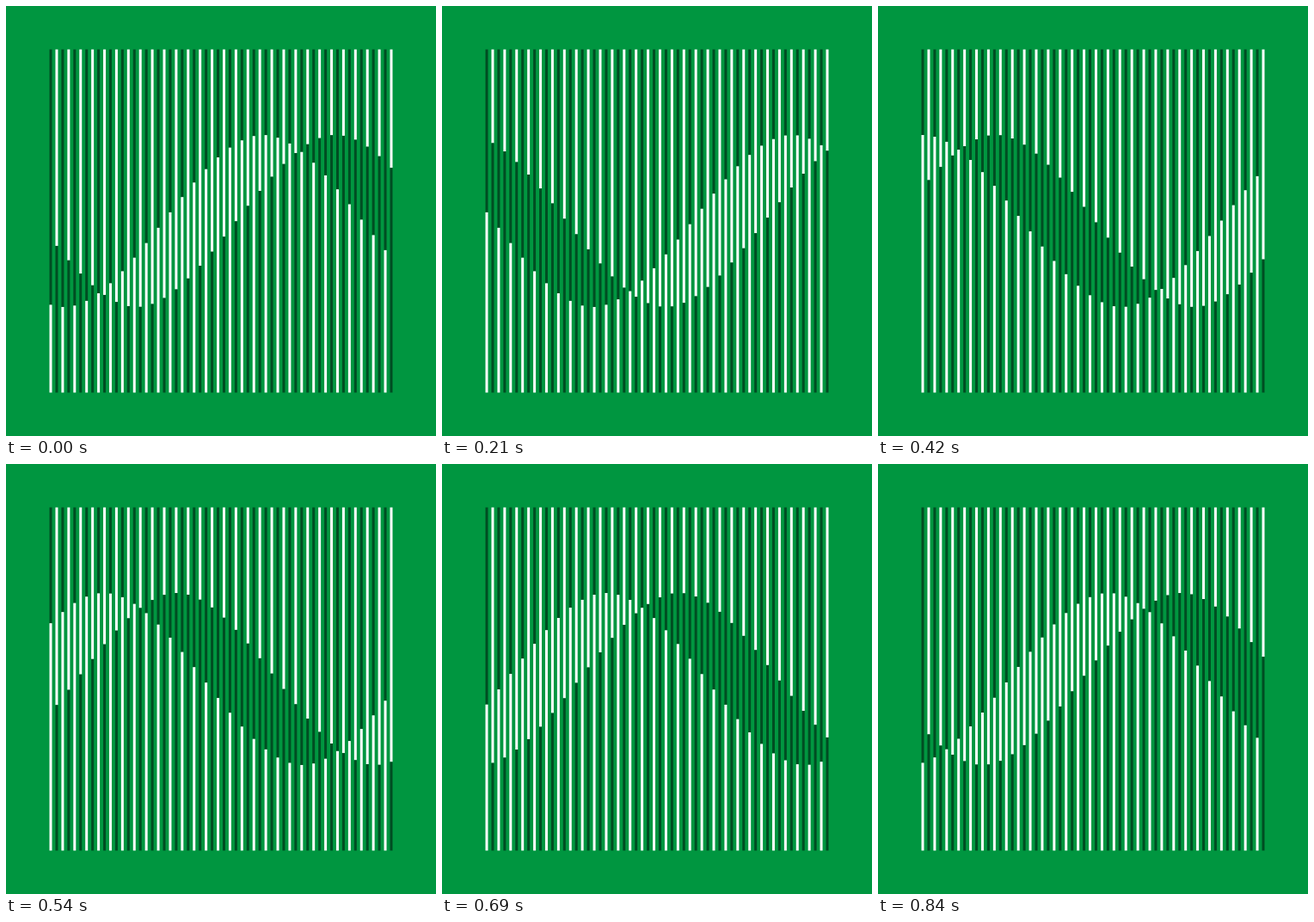
These frames come from a looping animation (500 px wide and 500 px high, 0.9 s). An HTML page with a canvas:

```html
<!DOCTYPE html>
<html lang="en">
<head>
<meta charset="utf-8">
<title>Line waves</title>
<style>
  html, body { margin: 0; width: 100%; height: 100%; overflow: hidden; background: #009640; }
  canvas { display: block; width: 500px; height: 500px; }
</style>
</head>
<body>
<canvas id="stage" width="500" height="500"></canvas>
<script>
const ctx = document.getElementById('stage').getContext('2d');
const GREEN = '#009640', DARK = '#004d22', WHITE = '#fff';
const LINES = 58, LEFT = 52, RIGHT = 448, WIDTH = 3;
const TOP = 50.5, BOTTOM = 449.5;
const CREST = 150, TROUGH = 350, WAVELENGTH = 462.6;
const LOOP = 900, STEP = 30, STEPS = LOOP / STEP;
const TROUGH_X = [67.5, 152]; // start of the even and odd waves

// Eased up-and-down travel, one cycle per unit of phase
function waveY(phase) {
  const p = phase - Math.floor(phase);
  const s = p < 0.5 ? p * 2 : 2 - p * 2;
  return TROUGH + (CREST - TROUGH) * s * s * (3 - 2 * s);
}

function bar(x, y1, y2, color) {
  ctx.fillStyle = color;
  ctx.fillRect(x - WIDTH / 2, y1, WIDTH, y2 - y1);
}

function draw(time) {
  // The last pose is held for two steps
  const step = Math.min(Math.floor((time % LOOP) / STEP), STEPS - 2);
  ctx.fillStyle = GREEN;
  ctx.fillRect(0, 0, 500, 500);
  for (let i = 0; i < LINES; i++) {
    const odd = i % 2;
    const x = LEFT + (RIGHT - LEFT) * i / (LINES - 1);
    const y = waveY((x - TROUGH_X[odd]) / WAVELENGTH - step / STEPS);
    bar(x, TOP, y, odd ? WHITE : DARK);
    bar(x, y, BOTTOM, odd ? DARK : WHITE);
  }
}

const start = performance.now();
function tick() {
  draw(performance.now() - start);
  requestAnimationFrame(tick);
}
tick();
</script>
</body>
</html>
```
